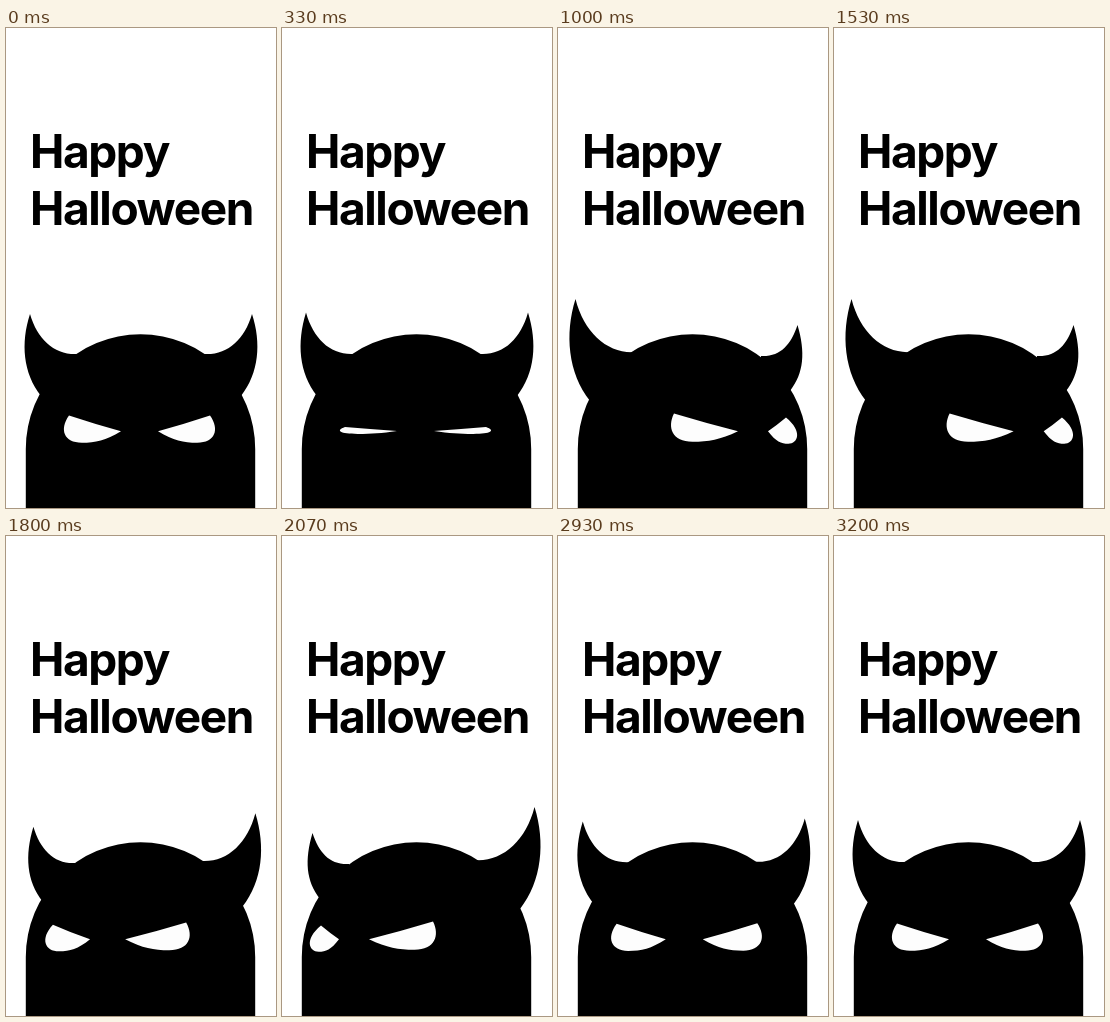
These frames come from a looping animation (270 by 480 pixels, 3.39 s). An HTML page with a canvas:

```html
<!DOCTYPE html>
<html lang="en">
<head>
<meta charset="utf-8">
<title>Happy Halloween</title>
<style>
  html, body { margin: 0; width: 100%; height: 100%; overflow: hidden; background: #fff; }
  canvas { position: absolute; left: 0; top: 0; width: 270px; height: 480px; }
  p {
    position: absolute; left: 24px; margin: 0;
    font: 700 46px/56px Inter, "Open Sans", sans-serif;
    letter-spacing: -1.4px; color: #000; white-space: nowrap;
  }
</style>
</head>
<body>
<canvas></canvas>
<p style="top:95px">Happy</p>
<p style="top:152px">Halloween</p>
<script>
const LOOP = 3390, STEP = 1000 / 15;
const canvas = document.querySelector('canvas');
const ctx = canvas.getContext('2d');
const ratio = window.devicePixelRatio || 1;
canvas.width = 270 * ratio;
canvas.height = 480 * ratio;

const clamp = v => Math.min(1, Math.max(0, v));

// Quick swing with a soft landing, 600 ms long
function swing(t, start) {
  const p = clamp((t - start) / 600);
  return 1 - Math.pow(1 - p * p, 5.8);
}

// -1 looks left, 1 looks right
const lookAt = t => swing(t, 467) - 2 * swing(t, 1520) + swing(t, 2600);

function blink(t, start, length) {
  const s = Math.sin(Math.PI * clamp((t - start) / length));
  return 1 - 0.95 * s * s;
}

// The motion runs at 15 steps a second, a few steps are held longer
function stepTime(t) {
  let n = Math.floor((t + 5) / STEP);
  if (n === 9 || n === 10) n = 8;
  if (n === 36 || n === 40) n--;
  return n * STEP;
}

function mirrored(sum, draw) {
  ctx.save();
  ctx.translate(sum, 0);
  ctx.scale(-1, 1);
  draw();
  ctx.restore();
}

function body() {
  ctx.beginPath();
  ctx.arc(134.5, 421, 114.7, Math.PI, 0);
  ctx.lineTo(249.2, 480);
  ctx.lineTo(19.8, 480);
  ctx.fill();
}

// Left horn; a grows it from -1 (small) to 1 (large)
function horn(a, dip) {
  const tipX = 24 - 6.5 * a, tipY = 284 - 13 * a + dip;
  ctx.beginPath();
  ctx.moveTo(tipX, tipY);
  ctx.bezierCurveTo(14.5 - 8 * a, 315 - 9 * a, 17 - 7 * a, 345, 35 - 3 * a, 368 + 5 * a);
  ctx.lineTo(72 + 5 * a, 340);
  ctx.lineTo(72 + 5 * a, 326 - 2 * a);
  ctx.bezierCurveTo(49 + a, 327.5 - 1.5 * a, 31.5 - 5.5 * a, 311 - 6 * a + dip / 2, tipX, tipY);
  ctx.fill();
}

// Left eye; k is the look direction seen from its side
function eye(k, open) {
  const k2 = k * k;
  const tip = 115 + 61.5 * k + 3.5 * k2;
  const left = 59 + 43.5 * k + 12.5 * k2;
  const corner = 63 + 38.5 * k + 14.5 * k2;
  const w = tip - left;
  const y = v => 403 + (v - 403) * open;
  const top = 387.6 - 2 * k, bottom = 414.8 - k, mid = 403.3;
  ctx.beginPath();
  ctx.moveTo(corner, y(top));
  ctx.quadraticCurveTo((corner + tip) / 2, y((top + mid) / 2 + 0.8), tip, y(mid));
  ctx.bezierCurveTo(tip - 0.28 * w, y(bottom - 2), left + 0.55 * w, y(bottom), left + 0.3 * w, y(bottom));
  ctx.bezierCurveTo(left - 1, y(bottom), left - 6, y(top + 14), corner, y(top));
  ctx.fill();
}

function draw(t) {
  const k = lookAt(t);
  const open = blink(t, 20, 480) * blink(t, 2120, 480);
  const dip = 2 * (1 - clamp(t / 470));
  ctx.setTransform(ratio, 0, 0, ratio, 0, 0);
  ctx.clearRect(0, 0, 270, 480);
  ctx.fillStyle = '#000';
  body();
  horn(k, dip);
  mirrored(270, () => horn(-k, dip));
  ctx.fillStyle = '#fdfdfd';
  eye(k, open);
  mirrored(267, () => eye(-k, open));
}

function tick() {
  draw(stepTime(performance.now() % LOOP));
  requestAnimationFrame(tick);
}
tick();
</script>
</body>
</html>
```
